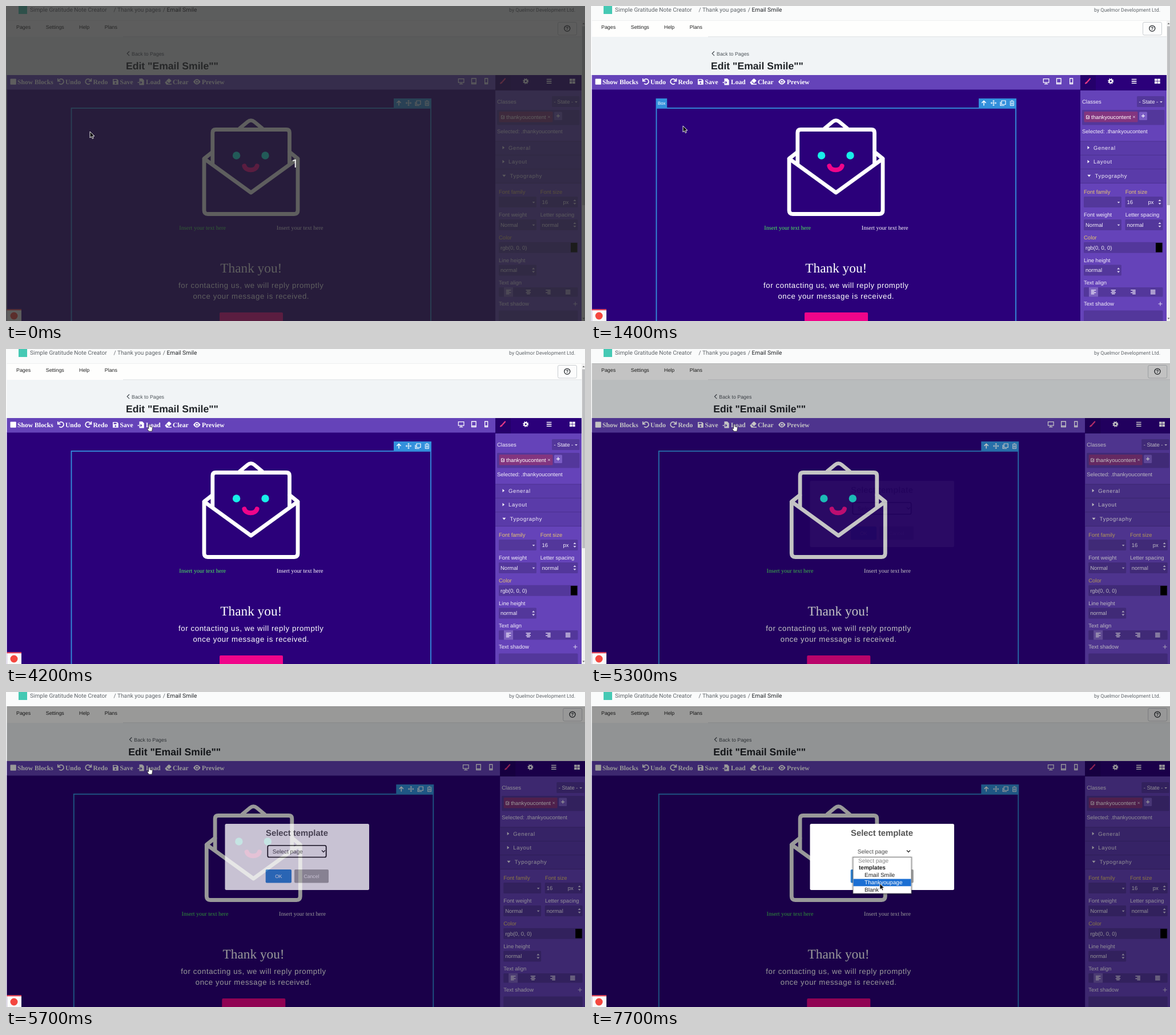
Recreate the animation shown at these times as an HTML page. Size 1014 px wide and 552 px high, loop 8 s.

```html
<!DOCTYPE html>
<html lang="en">
<head>
<meta charset="utf-8">
<title>Page editor</title>
<style>
html, body { margin: 0; width: 100%; height: 100%; overflow: hidden; background: #fbfcfc; }
svg { display: block; width: 100vw; height: 100vh; }
text { font-family: "Liberation Sans", Arial, sans-serif; text-rendering: geometricPrecision; white-space: pre; }
.roboto { font-family: Roboto, sans-serif; }
.serif { font-family: "Liberation Serif", "Times New Roman", serif; }
.bold { font-weight: 700; }
.mid { text-anchor: middle; }
.end { text-anchor: end; }
.spaced { letter-spacing: .7px; }
</style>
</head>
<body>
<svg id="stage" viewBox="0 0 1014 552" preserveAspectRatio="none"></svg>
<script>
const LOOP = 8000, TICK = 100;
const CANVAS = '#2b007a', BAR = '#6543b9', FIELD = '#53379b', BLUE = '#3390dc', PINK = '#f0058a';

const rect = (x, y, w, h, fill, more = '') =>
  `<rect x="${x}" y="${y}" width="${w}" height="${h}" fill="${fill}" ${more}/>`;
const text = (x, y, str, size, fill, cls = '', more = '') =>
  `<text x="${x}" y="${y}" font-size="${size}" fill="${fill}" class="${cls}" ${more}>${str}</text>`;
const line = (d, color = '#fff', width = 1.3, more = '') =>
  `<path d="${d}" fill="none" stroke="${color}" stroke-width="${width}" ${more}/>`;
const shape = (d, fill = '#fff', more = '') => `<path d="${d}" fill="${fill}" ${more}/>`;
const dot = (x, y, r, fill, more = '') => `<circle cx="${x}" cy="${y}" r="${r}" fill="${fill}" ${more}/>`;
const group = (id, ...parts) => `<g id="${id}">${parts.join('')}</g>`;
const round = 'stroke-linecap="round" stroke-linejoin="round"';

function header() {
  const crumb = (x, s, c) => text(x, 10.3, s, 10.15, c, 'roboto');
  return rect(0, 0, 1014, 25, '#fafbfb') + rect(22, 0, 15, 14, '#45c9b4') +
    crumb(42, 'Simple Gratitude Note Creator', '#5f6469') + crumb(188.5, '/', '#5f6469') +
    crumb(195, 'Thank you pages', '#5f6469') + crumb(274.8, '/', '#5f6469') +
    crumb(281.5, 'Email Smile', '#202327') +
    text(997, 10, 'by Quelmor Development Ltd.', 8.85, '#5f6469', 'roboto end');
}

function page() {
  const nav = [[18, 'Pages'], [69.8, 'Settings'], [128, 'Help'], [172.8, 'Plans']];
  return rect(1.5, 25, 1013, 97, '#f1f4f6') + rect(1.5, 25, 1013, 29, '#fefefd') +
    line('M1.5 25H1014M205 53.8H1014', '#dcdfe1', .9) +
    nav.map(([x, s]) => text(x, 40.4, s, 8.85, '#222')).join('') +
    rect(1.5, 146, 1013, 406, CANVAS) + rect(1.5, 121, 1013, 25.5, BAR);
}

function toolbar() {
  const labels = [[20, 'Show Blocks'], [104, 'Undo'], [152.5, 'Redo'], [199.5, 'Save'],
    [245, 'Load'], [292, 'Clear'], [343, 'Preview']];
  return labels.map(([x, s]) => text(x, 136.8, s, 11.6, '#fff', 'serif bold')).join('') +
    rect(7.5, 127.5, 10.3, 10.3, '#fff', 'rx="1"') +
    line('M92 131a4.6 4.6 0 1 1 1.2 4.8M90.8 127v4.6h4.6', '#fff', 1.7) +
    line('M148.2 131a4.6 4.6 0 1 0-1.2 4.8M149.4 127v4.6h-4.6', '#fff', 1.7) +
    shape('M187 128h7.5l2.3 2.3v7.5h-9.8z') + rect(188.6, 129.2, 5, 2.6, BAR) + dot(191.8, 135, 1.5, BAR) +
    shape('M233.5 127h5.2l3 3v8.5h-8.2z') + line('M230.5 134h6.5', '#fff', 1.5) +
    line('M233.5 134h4m-2-2.2l2.2 2.2l-2.2 2.2', BAR, 1.2) +
    shape('M278.3 134l6-6.4h2.2l3.3 3.4-5.2 5.3h5.4v1.5h-9z') + line('M281.5 132.3l3.8 3.7', BAR, 1.1) +
    shape('M328 132.7q6.2-9.4 12.6 0q-6.4 9.4-12.6 0z') + dot(334.3, 132.7, 2.9, BAR) + dot(334.3, 132.7, 1.7, '#fff');
}

function envelope() {
  return line('M361.5 256L347 267.5V358q0 6.5 6.5 6.5H504.500q6.5 0 6.5-6.500V267.500L496.800 256M347 267.5L429 327L511 267.5', '#fff', 6.8, round) +
    line('M361.8 277V222q0-5.500 5.500-5.500H491q5.500 0 5.500 5.500V277', '#fff', 6.8, round) +
    line('M408.500 215L423 203q6-5 12 0L449.500 215', '#fff', 6.5, 'stroke-linejoin="round"') +
    dot(403.6, 262, 6.7, '#18efe9') + dot(454, 262, 6.7, '#18efe9') +
    line('M417.4 280.3C420 289.7 437 289.7 439.600 280.3', PINK, 8, round);
}

function middle() {
  const tip = 'M688 174.500v-8m-3.600 3.400l3.600-3.600l3.600 3.600';
  const move = 'M700.500 170h9M705 165.500v9M703.500 167l1.500-1.700 1.500 1.700M703.500 173l1.500 1.700 1.500-1.700M702 168.500l-1.700 1.500 1.700 1.500M708 168.500l1.700 1.500-1.700 1.500';
  return line('M216 79.500l-3.800 3.800 3.800 3.800', '#444b52', 1.2) +
    text(220, 86.6, 'Back to Pages', 8.85, '#4c5359') +
    text(210, 110.5, 'Edit "Email Smile""', 17.6, '#212529', 'bold') +
    `<rect x="114.500" y="179" width="629.500" height="400" fill="none" stroke="${BLUE}" stroke-width="1.8"/>` +
    rect(679, 162, 66, 16.5, BLUE) + line(tip, '#fff', 1.5) + line(move, '#fff', 1) +
    line('M719 166h7v6.500h-7zM717 168v6.500h7', '#fff', 1.2) +
    line('M733.500 167h7.500M736 165.800h2.500M734.300 168v6.500h6V168M736.300 169v4M738.300 169v4', '#fff', 1) +
    group('badge', rect(113.6, 162, 19.6, 16.5, BLUE), text(117, 172.900, 'Box', 7.8, '#fff')) +
    envelope() +
    text(303.3, 391.6, 'Insert your text here', 10.15, '#4df05c', 'serif') +
    text(473.8, 391.6, 'Insert your text here', 10.15, '#fff', 'serif') +
    text(429.3, 467, 'Thank you!', 23.3, '#fff', 'serif mid') +
    text(302, 493.700, 'for contacting us, we will reply promptly', 13.2, '#fff', '', 'letter-spacing=".61"') +
    text(327.400, 513.200, 'once your message is received.', 13.2, '#fff', '', 'letter-spacing=".61"') +
    rect(374, 537, 111, 30, PINK, 'rx="2"');
}

function devices() {
  return line('M792.300 127.600h9.600v6.500h-9.600zM797 134v2.500M794 136.700h6.200', '#fff', 1.2) +
    line('M815.500 127h7.600v9.500h-7.600zM815.500 134.700h7.600', '#fff', 1.3) +
    line('M838.600 127h5v9.500h-5zM838.600 134.700h5', '#fff', 1.3);
}

function panel() {
  const label = (x, y, s, c = '#f3effa') => text(x, y, s, 9.5, c);
  const gold = '#e6c46e';
  const field = (x, y, w, s) => rect(x, y, w, 19, FIELD, 'rx="1.5"') + label(x + 3, y + 12.9, s);
  const caret = (x, y) => shape(`M${x - 2.3} ${y - 1}h4.600l-2.300 2.800z`, '#d9d0ee');
  const spin = (x, y) => shape(`M${x - 2.500} ${y - 1.500}h5l-2.500-3zM${x - 2.500} ${y + 1.500}h5l-2.500 3z`, '#d9d0ee');
  const sector = (x, y, s) => text(x, y, s, 9.5, '#f3effa', 'spaced');
  const aligns = [0, 1, 2, 3].map(i => {
    const x = 875.8 + i * 34.7;
    return [0, 1, 2, 3].map(j => {
      const w = i === 3 || j % 2 === 0 ? 8.5 : 5.5;
      const dx = i === 1 ? (8.5 - w) / 2 : i === 2 ? 8.5 - w : 0;
      return rect(x + dx, 497.3 + j * 2.2, w, 1.2, '#f3effa');
    }).join('');
  }).join('');
  return rect(857, 121, 157, 431, BAR) + rect(857, 121, 157, 27, CANVAS) + rect(857, 121, 27, 27, '#25006b') +
    line('M874 127.500l-4.500 5', '#e93a85', 2.300, round) + shape('M865 136.500q1.500-5 4-3.500q2 2.500-4 3.500z', '#e93a85') +
    line('M866 135.500l2.500-2', '#e93a85', 2, round) +
    dot(910.200, 131.800, 2.700, 'none', 'stroke="#fff" stroke-width="2.200"') +
    dot(910.200, 131.800, 4.300, 'none', 'stroke="#fff" stroke-width="1.500" stroke-dasharray="1.690 1.690"') +
    line('M946.800 128.500h8.600M946.800 131.900h8.600M946.800 135.300h8.600', '#fff', 1.600) +
    [0, 1].map(i => rect(987 + i * 5.200, 127.500, 4.500, 3.900, '#fff') + rect(987 + i * 5.200, 132.200, 4.500, 3.900, '#fff')).join('') +
    label(860, 171.300, 'Classes') + rect(956, 158, 48.500, 19, FIELD, 'rx="1.500"') + label(959.500, 171.300, '- State -') + caret(998.500, 168) +
    rect(860, 182, 144.500, 26.500, FIELD, 'rx="1.500"') + rect(863.500, 185, 94, 18.500, '#83357f', 'rx="1.500"') +
    line('M872.500 193.500v4h-5v-5.500h4M868.800 194.500l1.300 1.500 3-4', '#fff', .900) +
    label(876, 197.600, 'thankyoucontent', '#fff') + line('M949.300 192.700l3.400 3.400m0-3.400l-3.400 3.400', '#e3cfe4', 1) +
    rect(960, 185.500, 14, 14.500, '#7a5cc4', 'rx="1.500"') + line('M964 192.600h6M967 189.600v6', '#fff', 1.200) +
    label(860, 222.700, 'Selected: .thankyoucontent') +
    rect(857, 237, 157, 73.500, '#5a3ba9') + line('M857 237H1014M857 261.300H1014M857 285.700H1014M857 310.500H1014', '#4c3192', 1) +
    shape('M869.500 245.300l3.600 2.900-3.600 2.900z', '#f3effa') + sector(880, 251.700, 'General') +
    shape('M869.500 269.800l3.600 2.900-3.600 2.900z', '#f3effa') + sector(880, 276.300, 'Layout') +
    shape('M869.300 295.800h6l-3 3.600z', '#f3effa') + sector(882.500, 300.900, 'Typography') +
    label(863, 329.300, 'Font family', gold) + label(935.700, 329.300, 'Font size', gold) +
    field(863, 334, 66, '') + caret(924, 344) + field(935.500, 334, 66, '16') + label(975.500, 346.900, 'px') + spin(996, 343.500) +
    label(863, 369.200, 'Font weight') + label(935.700, 369.200, 'Letter spacing') +
    field(863, 374, 66, 'Normal') + caret(924, 383.800) + field(935.500, 374, 66, 'normal') + spin(996, 383.500) +
    label(863, 409, 'Color', gold) + field(863, 413.700, 138.500, 'rgb(0, 0, 0)') + rect(989, 415, 11.500, 16.500, '#000') +
    label(863, 448.700, 'Line height') + field(863, 453.500, 66, 'normal') + spin(923.700, 463) +
    label(863, 488.300, 'Text align') + rect(863, 493, 138.500, 16.500, FIELD, 'rx="1.500"') + rect(872, 493, 16, 16.500, '#7d62bf') + aligns +
    label(863, 524.900, 'Text shadow') + line('M993.500 522h7M997 518.500v7', '#d9d0ee', 1.100) +
    rect(863, 533.500, 138.500, 25, FIELD, 'rx="1.500"');
}

function help() {
  return `<rect x="966.500" y="28.500" width="33" height="22.500" rx="2.500" fill="#fcfcfc" stroke="#c9cdd1"/>` +
    dot(982.800, 39.300, 5, 'none', 'stroke="#212529" stroke-width="1.300"') +
    text(982.800, 42.200, '?', 8, '#212529', 'bold mid');
}

function scrollbar() {
  return rect(1008, 25, 6, 527, '#f1f1f1') + rect(1009, 35.500, 5, 313.500, '#bfc0c2') +
    shape('M1009.500 32h4l-2-2.500zM1009.500 546.500h4l-2 2.500z', '#666');
}

function modal() {
  const button = (x, w, s, fill) => rect(x, 311, w, 23.500, fill, 'rx="2"') + text(x + w / 2, 325.900, s, 8.600, '#fff', 'mid');
  return rect(383.500, 231, 252.500, 116, '#fff', 'rx="2.500"') +
    text(509.500, 252.200, 'Select template', 14.850, '#555', 'bold mid') +
    `<rect id="ring" x="458.300" y="269" width="102.400" height="20.500" rx="2.500" fill="none" stroke="#111" stroke-width="1.700"/>` +
    text(466.800, 282.700, 'Select page', 10.050, '#4b4b4b') + line('M553 277.500l3 3 3-3', '#222', 1.300) +
    button(454.700, 45.300, 'OK', '#3085d6') + button(505, 60, 'Cancel', '#aaa');
}

const ROW_TOP = 289.300, ROW = 12.750;
const OPTIONS = [['Select page', 468, '#888'], ['templates', 469, '#222', 'bold'],
  ['Email Smile', 479, '#222'], ['Thankyoupage', 479, '#222'], ['Blank', 479, '#222']];
function dropdown() {
  return rect(456.500, 288, 107, 68, '#000', 'opacity=".15" rx="2"') +
    `<rect x="459" y="289.500" width="102" height="63.500" fill="#fff" stroke="#777" stroke-width=".900"/>` +
    rect(459.500, 0, 101, ROW, '#1b6fd3', 'id="hover"') +
    OPTIONS.map(([s, x, c, cls]) => [s, x, c, cls]).map(([s, x, c, cls = ''], i) =>
      text(x, ROW_TOP + i * ROW + 9.400, s, 10.050, c, 'option ' + cls)).join('');
}

const arrow = `<path id="arrow" d="M0 0V11L2.600 8.700L4.300 12.500L6.200 11.700L4.600 8H8Z" fill="#111" stroke="#fff" stroke-width=".900"/>`;
const hand = `<path id="hand" d="M-1.200 1Q0-.800 1.200 1V4.500L5 5.300Q5.800 5.700 5.600 7L4.700 12.700H-.800L-3.600 8.500Q-3.800 6.900-1.200 8Z" fill="#fff" stroke="#222" stroke-width=".800"/>`;

const stage = document.getElementById('stage');
stage.innerHTML = rect(0, 0, 1014, 552, '#fbfcfc') + page() + toolbar() +
  group('middle', middle()) + group('devices', devices()) + group('panel', panel()) + group('help', help()) +
  group('scroll', scrollbar()) + rect(1.500, 25, 1013, 527, '#000', 'id="shade"') + header() +
  group('modal', modal()) + group('dropdown', dropdown()) +
  group('debug', rect(1.500, 531.500, 25.500, 21, '#fafafa'), rect(1.500, 531.500, 25.500, 1.700, '#f02a3c'), dot(14, 543, 6.500, '#f4473f')) +
  group('tooltip', rect(256, 144, 143, 17, '#2f2f2f', 'rx="2"'), text(327.500, 155.700, 'Load another page or template', 8.800, '#fff', 'mid')) +
  group('countdown', rect(0, 0, 1014, 552, '#262626', 'opacity=".740"'), text(506, 283, '1', 20, '#fff', 'roboto mid')) +
  group('cursor', arrow, hand);

const el = Object.fromEntries([...stage.querySelectorAll('[id]')].map(n => [n.id, n]));
const options = [...stage.querySelectorAll('.option')];
const show = (node, on) => node.setAttribute('display', on ? 'inline' : 'none');
const shift = (node, x, y = 0) => node.setAttribute('transform', `translate(${x} ${y})`);
const clamp = v => Math.min(1, Math.max(0, v));

// time, x, y of the pointer tip
const PATH = [[0, 147, 220], [1200, 147, 220], [1400, 161, 210], [1500, 161, 210], [1900, 283, 139], [2000, 283, 139],
  [2300, 294, 134.500], [2500, 294, 134.500], [2800, 249, 142], [2900, 249, 142], [3000, 245, 135], [3400, 245, 135],
  [3500, 251, 131.500], [5700, 251, 131.500], [6100, 384, 228], [6200, 440, 285], [6300, 510, 322], [6400, 546, 300],
  [6500, 546, 300], [6600, 540, 278], [6800, 540, 283], [6900, 540, 283], [7700, 505.800, 335.500], [LOOP, 505.800, 335.500]];

function pointer(t) {
  const i = PATH.findIndex(k => k[0] > t);
  const [a, b] = [PATH[i - 1], PATH[i]];
  const p = (t - a[0]) / (b[0] - a[0]);
  return [a[1] + (b[1] - a[1]) * p, a[2] + (b[2] - a[2]) * p];
}

function draw(ms) {
  const t = Math.floor((ms % LOOP) / TICK) * TICK;
  const open = t >= 5300, list = t >= 6700;
  const [x, y] = pointer(t);

  show(el.countdown, t < 100);
  show(el.badge, t >= 100 && t < 1700);
  show(el.tooltip, t >= 3900 && t < 4200);

  shift(el.middle, open ? 4.300 : 0);
  for (const part of [el.devices, el.panel]) shift(part, open ? 8.200 : 0);
  shift(el.help, open ? 9.200 : 0);
  show(el.scroll, !open);
  el.shade.setAttribute('opacity', open ? Math.min(.4, .23 + (t - 5300) * .0012) : 0);
  el.modal.setAttribute('opacity', open ? clamp(.04 + (t - 5300) * .0018) : 0);

  show(el.ring, !list);
  show(el.dropdown, list);
  const row = Math.floor((y - ROW_TOP) / ROW);
  const hot = row > 1 && row < OPTIONS.length ? row : -1;
  show(el.hover, hot >= 0);
  el.hover.setAttribute('y', ROW_TOP + hot * ROW);
  options.forEach((o, i) => o.setAttribute('fill', i === hot ? '#fff' : OPTIONS[i][2]));

  const pointing = t >= 1900 && t < 5800;
  show(el.hand, pointing);
  show(el.arrow, !pointing);
  shift(el.cursor, x, y);
}

const start = performance.now();
function frame(now) {
  draw(Math.max(0, now - start));
  requestAnimationFrame(frame);
}
draw(0);
requestAnimationFrame(frame);
</script>
</body>
</html>
```
